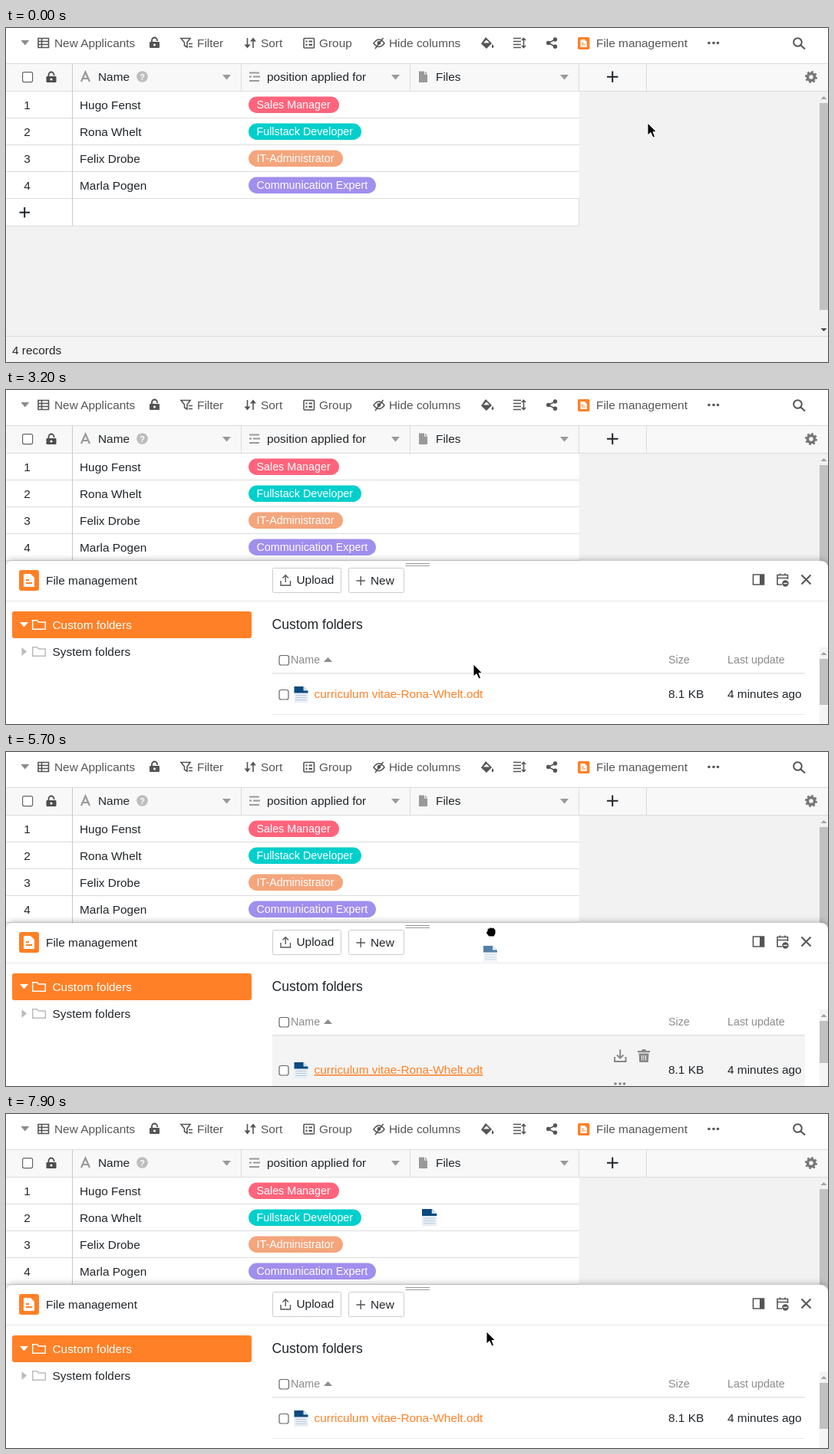
An HTML page that plays this animation: 1071x436 px, repeating every 8000 ms.

```html
<!DOCTYPE html>
<html lang="en">
<head>
<meta charset="utf-8">
<title>Drag a file into a table</title>
<style>
html, body { margin: 0; width: 100%; height: 100%; overflow: hidden; background: #fff; }
svg { display: block; font: 15.4px "Liberation Sans", Arial, sans-serif; fill: #212529; }
.bar text { fill: #555; }
.small { font-size: 14.3px; }
.muted { fill: #8c8c8c; }
.line { fill: none; stroke: #dcdcdc; }
.ico { fill: none; stroke: #555; stroke-width: 1.6; }
.solid { fill: #555; }
.box { fill: #fff; stroke: #666; stroke-width: 1.2; }
.white { fill: #fff; }
.orange { fill: #ff8027; }
</style>
</head>
<body>
<svg width="1071" height="436" viewBox="0 0 1071 436">
<defs>
  <g id="lock"><rect y="6" width="13" height="8" rx="1"/><path d="M3 7V4A3.5 3.5 0 0 1 10 4V5" fill="none" stroke="#4d4d4d" stroke-width="1.8"/><circle cx="6.5" cy="10" r="1.6" fill="#fff"/></g>
  <path id="down" d="M0 0H11L5.5 6.5Z"/>
  <path id="up" d="M0 4H8L4 0Z"/>
  <path id="folder" d="M.7 12.3V.7H6.5L8.5 3H17.3V12.3Z" fill="none" stroke-width="1.5"/>
  <g id="app"><rect width="26" height="27" rx="3" class="orange"/><path d="M6 5H15L20 10V22H6Z" class="white"/><path d="M9 13H13M9 17H17" stroke="#ff8027" stroke-width="2"/></g>
  <g id="doc"><path d="M0 0H13L18 5V21H0Z" fill="#e9eff6"/><path d="M0 0H12L18 6V8.5H0Z" fill="#0d4a80"/><path d="M12 0V5.5H18Z" fill="#d5e0ec"/><path d="M2 11.5H16M2 14.5H16M2 17.5H16" stroke="#b9cbdd"/></g>
  <g id="dots"><circle cx="2" cy="2" r="1.8"/><circle cx="8" cy="2" r="1.8"/><circle cx="13.5" cy="2" r="1.8"/></g>
  <filter id="shade" x="-5%" y="-10%" width="110%" height="120%"><feDropShadow dx="0" dy="-1" stdDeviation="4" flood-opacity=".28"/></filter>
</defs>

<!-- table background -->
<path d="M0 83H1071V436H0Z" fill="#f2f2f2"/>
<path d="M0 47H1071V82H0Z" fill="#f8f8f8"/>
<path d="M0 83H747V258H0Z" class="white"/>
<path id="rowHover" d="M0 118H746V152H0Z" fill="#f5f5f5"/>
<path class="line" d="M0 46.5H1071M0 82.5H1071M0 117.5H747M0 152.5H747M0 187.5H747M0 222.5H747M0 258.5H747M306.5 47V82M526.5 47V82M746.5 47V82M746.5 223V258M834.5 47V82"/>
<path class="line" d="M86.5 47V258" style="stroke:#c8c8c8"/>

<!-- toolbar -->
<rect id="buttonHover" x="736" y="8" width="161" height="25" rx="2"/>
<g class="bar">
  <use href="#down" x="19.3" y="16" class="muted"/>
  <path class="ico" d="M42 13.5H55.5V25.5H42ZM42 17.5H55.5M42 21.5H55.5M46.5 13.5V25.5"/>
  <text x="63" y="25">New Applicants</text>
  <use href="#lock" x="187" y="12" class="solid"/>
  <path class="ico" d="M228 13.5H240L236 19V25L232.5 23V19ZM238 20.5H243M238 24.5H243"/>
  <text x="249" y="25">Filter</text>
  <path class="ico" d="M314.5 13V25M322 26V14" stroke-width="2"/><path class="solid" d="M310.5 21.5H318.5L314.5 26.5ZM318 17.5H326L322 12.5Z"/>
  <text x="332" y="25">Sort</text>
  <rect class="ico" x="388" y="13.5" width="13.5" height="12.5" rx="1"/><path class="ico" d="M390.5 17.5H392.5M394.5 17.5H399M390.5 21.8H392.5M394.5 21.8H399" style="stroke-width:2.2"/>
  <text x="408" y="25">Group</text>
  <path class="ico" d="M479 20Q486 10 493 20Q486 29 479 20ZM481 27L491.5 13"/><circle class="solid" cx="486" cy="19.5" r="2.4"/>
  <text x="499" y="25">Hide columns</text>
  <path class="solid" d="M625 12L633 20L626 27L619 20.5ZM634 21Q637 25.5 634 26Q631.5 25.5 634 21Z"/><path d="M622 19.5L626 15.5L630 19.5Z" class="white"/>
  <path class="ico" d="M661 13.5H671M661 17.5H671M661 21.5H671M661 25.5H671M674.5 14V25M672 16L674.5 13.5L677 16M672 23L674.5 25.5L677 23"/>
  <path class="ico" d="M716 15L706.5 19.5L716 24.5"/><g class="solid"><circle cx="715.5" cy="15" r="2.7"/><circle cx="706.7" cy="19.5" r="2.7"/><circle cx="715.5" cy="24.3" r="2.7"/></g>
  <use href="#app" transform="translate(745 12) scale(.59)"/>
  <text x="769" y="25">File management</text>
  <use href="#dots" x="914" y="17.5" class="solid"/>
  <circle class="ico" cx="1031.5" cy="18.5" r="5.3" style="stroke-width:2"/><path class="ico" d="M1035.5 22.5L1041 27.5" style="stroke-width:2.2"/>
</g>

<!-- column heads -->
<rect class="box" x="21.6" y="57.6" width="13" height="13" rx="2"/>
<use href="#lock" x="52.5" y="57" fill="#4d4d4d"/>
<path d="M98 70L103.5 57.5L109 70M100.5 66H106.5" fill="none" stroke="#999" stroke-width="2.2"/>
<text x="120" y="69">Name</text>
<circle cx="177.5" cy="63.5" r="7.3" fill="#bdbdbd"/><text x="177.5" y="67.5" text-anchor="middle" class="white" style="font:bold 11px 'Liberation Sans',sans-serif">?</text>
<path d="M317 58.5H330M322 63.5H331M317 69H330M317 63.5H320" stroke="#999" stroke-width="1.8"/>
<text x="340" y="69">position applied for</text>
<path d="M538 56.5H545V60.5H549V71H538ZM546 56.5L549 59.5H546Z" fill="#999"/>
<text x="560" y="69">Files</text>
<g fill="#999"><use href="#down" x="282" y="61"/><use href="#down" x="502" y="61"/><use href="#down" x="722" y="61"/></g>
<path d="M783 63.7H797.5M790.2 56.5V71M17.5 240.7H31M24.2 234V247.5" stroke="#212529" stroke-width="2"/>
<g fill="none" stroke="#777"><circle cx="1049" cy="64" r="4.5" stroke-width="3.6"/><circle cx="1049" cy="64" r="6.9" stroke-width="2.2" stroke-dasharray="2.71"/></g>

<g id="rows"></g>

<!-- scrollbar and footer -->
<path d="M1060 98H1071V368H1060Z" fill="#c1c1c1"/>
<use href="#up" x="1061.5" y="89" fill="#a3a3a3"/><path d="M1061.5 392H1069.5L1065.5 396Z" fill="#444"/>
<path d="M0 403H1071V436H0Z" fill="#f4f4f4"/><path class="line" d="M0 402.5H1071"/>
<text x="8" y="426">4 records</text>

<use id="cellDoc" href="#doc" transform="translate(542 124) scale(1.07)"/>
<g id="drop">
  <rect x="527.5" y="118.5" width="200" height="33" fill="#fff2e8" stroke="#f6a264" stroke-dasharray="3 2"/>
  <text x="536.5" y="141" fill="#999">Drag and drop to add a file</text>
</g>

<!-- file panel -->
<g id="panel">
  <path d="M0 450V233Q0 223 10 223H1061Q1071 223 1071 233V450Z" class="white" filter="url(#shade)"/>
  <path d="M520.5 226.5H552M520.5 229.5H552" stroke="#999"/>
  <use href="#app" x="17" y="235"/>
  <text x="52" y="254">File management</text>
  <path class="ico" d="M973.5 241H987.5V254H973.5Z"/><path class="solid" d="M982 241H988V254H982Z"/>
  <path class="ico" d="M1011 254H1005V241.5H1018.5V247M1005 245.5H1018.5M1008.5 239.5V242M1015 239.5V242"/><circle class="solid" cx="1015.5" cy="252.5" r="4.2"/><path d="M1013 252.5H1018" stroke="#fff" stroke-width="1.4"/>
  <path class="ico" d="M1036.5 241.5L1048.5 253.5M1048.5 241.5L1036.5 253.5" style="stroke-width:2"/>
  <g id="content">
    <rect class="line" x="347.5" y="232.5" width="89" height="32" rx="2" style="stroke:#ccc"/>
    <path class="ico" d="M358 249V255H370.5V249M364.2 251V242M360.5 245.5L364.2 241.8L368 245.5" style="stroke-width:1.4"/>
    <text x="378.5" y="253">Upload</text>
    <rect class="line" x="446.5" y="232.5" width="72" height="32" rx="2" style="stroke:#ccc"/>
    <path class="ico" d="M456.5 249H468M462.2 243V255" style="stroke-width:1.4"/>
    <text x="475" y="254">New</text>
    <path class="line" d="M0 275.5H1071" style="stroke:#e8e8e8"/>
    <rect x="8" y="289" width="312" height="35" rx="3" class="orange"/>
    <use href="#down" x="18" y="303" class="white"/><use href="#folder" x="34" y="300" stroke="#fff"/>
    <text x="60.5" y="312" class="white">Custom folders</text>
    <path d="M20.5 336V347L27 341.5Z" fill="#bbb"/><use href="#folder" x="34" y="335" stroke="#bbb"/>
    <text x="60.5" y="347">System folders</text>
    <text x="346.5" y="312" font-size="17.6">Custom folders</text>
    <rect class="box" x="356" y="346.5" width="12.5" height="12.5" rx="2.5"/>
    <g class="small muted"><text x="371" y="357">Name</text><text x="863" y="357">Size</text><text x="940" y="357">Last update</text><path d="M414 355H425L419.5 349Z"/></g>
    <path id="fileHover" d="M347 370H1041V436H347Z" fill="#f4f4f4"/>
    <path class="line" d="M347 369.8H1041" style="stroke:#e4e4e4;stroke-width:1.5"/>
    <path id="fileLine" class="line" d="M347 423.5H1041" style="stroke:#e8e8e8"/>
    <g id="file">
      <rect class="box" x="356" y="391.5" width="12" height="12.5" rx="2.5"/>
      <use href="#doc" x="375.5" y="387"/>
      <text id="link" x="401.5" y="402" class="orange">curriculum vitae-Rona-Whelt.odt</text>
      <text x="863" y="402">8.1 KB</text><text x="940" y="402">4 minutes ago</text>
    </g>
    <g id="tools" fill="#888">
      <path d="M793 398V404H807.5V398M800.2 388.5V399M796 395.5L800.2 399.7L804.5 395.5" fill="none" stroke="#888" stroke-width="2"/>
      <path d="M823 390H828L829 388H833L834 390H839V392.3H823ZM824.5 393.5H837.5L836.8 405H825.2Z"/><path d="M828.5 396V402.5M831 396V402.5M833.5 396V402.5" stroke="#f4f4f4"/>
      <use href="#dots" x="792" y="431"/>
    </g>
    <path d="M1060 336H1071V436H1060Z" fill="#f4f4f4"/><use href="#up" x="1061.5" y="342" fill="#a3a3a3"/>
    <rect id="thumb" x="1060" y="351" width="11" fill="#c1c1c1"/>
  </g>
</g>

<!-- pointer -->
<use id="ghost" href="#doc" opacity=".7"/>
<g id="cursor" fill="#000" stroke="#fff">
  <path id="arrow" d="M0 0V16L4 12.5L7 19L9.5 18L7 11.5H11.5Z"/>
  <path id="hand" d="M3.5 1.5Q5 0 6.5 1.5V6L12 7.5Q13.5 8 13 10L12 15.5H4.5L1 11Q0 8.5 1.5 8.5L3.5 9.5Z"/>
  <path id="grab" d="M2 4Q3 1 5 2Q7 0 8 1.5Q10 .5 11 2.5Q13 3 13 5V9L11 13H4L1 9Q-.5 7 2 6Z"/>
  <path id="plus" d="M12.5 11.5H16.5V15H20V18.5H16.5V22H12.5V18.5H9V15H12.5Z" fill="#fff" stroke="#fff"/>
  <path id="plusMark" d="M14.5 12V21.5M9.7 16.8H19.3" stroke="#000" stroke-width="3.6"/><path id="plusCore" d="M14.5 13.3V20.2M11 16.8H18" stroke="#fff" stroke-width="1.4"/>
</g>
</svg>
<script>
const $ = id => document.getElementById(id);
const show = (id, on) => $(id).style.display = on ? '' : 'none';
const move = (id, x, y) => $(id).setAttribute('transform', `translate(${x} ${y})`);

// name, position, pill colour, pill width
const people = [
  ['Hugo Fenst', 'Sales Manager', '#ff647c', 118],
  ['Rona Whelt', 'Fullstack Developer', '#00cfcb', 147],
  ['Felix Drobe', 'IT-Administrator', '#f4a57c', 123],
  ['Marla Pogen', 'Communication Expert', '#a08fee', 166],
];
$('rows').innerHTML = people.map(([name, job, color, width], i) => `
  <g transform="translate(0 ${35 * i})">
    <text x="27.5" y="106" text-anchor="middle">${i + 1}</text><text x="96" y="106">${name}</text>
    <rect x="316" y="89.5" width="${width}" height="21.5" rx="10.7" fill="${color}"/>
    <text x="326.5" y="105" class="small white">${job}</text>
  </g>`).join('');

// time, x, y
const cursorPath = [
  [400, 836, 124], [600, 850, 64], [800, 850, 64], [900, 846, 16], [2400, 846, 16],
  [2500, 815, 82], [2900, 690, 262], [3300, 582, 390], [3900, 529, 409], [4900, 529, 409],
  [5400, 577, 350], [5700, 625, 228], [5800, 626, 160], [5900, 627, 141], [6000, 627, 134],
  [6200, 627, 123], [7600, 627, 123], [7900, 626, 284],
];
const ghostPath = [
  [4900, 525, 409], [5400, 572, 375], [5700, 622, 253], [5800, 622, 175], [5900, 622, 143],
  [6000, 622, 134], [6200, 622, 123],
];

function along(path, t) {
  const i = path.findIndex(k => k[0] > t);
  if (i < 0) return path.at(-1).slice(1);
  if (!i) return path[0].slice(1);
  const a = path[i - 1], b = path[i], p = (t - a[0]) / (b[0] - a[0]);
  return [a[1] + (b[1] - a[1]) * p, a[2] + (b[2] - a[2]) * p];
}

function draw(now) {
  const t = Math.floor(now % 8000 / 100) * 100;
  const during = (from, to) => t >= from && t < to;
  const [x, y] = along(cursorPath, t);

  show('buttonHover', during(900, 2600));
  $('buttonHover').setAttribute('fill', t < 2500 ? '#efefef' : '#f5f5f5');
  show('panel', t >= 1400);
  show('content', t >= 1500);
  move('panel', 0, t < 1500 ? 167 : 0);

  const fileOver = during(3300, 6800), linkOver = during(3600, 6800);
  for (const id of ['fileHover', 'tools']) show(id, fileOver);
  show('fileLine', !fileOver);
  move('file', 0, fileOver ? 18 : 0);
  $('link').setAttribute('text-decoration', linkOver ? 'underline' : 'none');
  $('thumb').setAttribute('height', fileOver ? 55 : 60);

  show('drop', during(5800, 6800));
  move('drop', 0, t < 5900 ? 35 : 0);
  show('rowHover', during(6800, 7700));
  show('cellDoc', t >= 6900);

  const dragging = during(5000, 6600), pointing = during(900, 2600) || during(3600, 5000);
  show('ghost', dragging);
  move('ghost', ...along(ghostPath, t));
  move('cursor', x, y);
  show('hand', pointing);
  show('grab', dragging);
  show('arrow', !pointing && !dragging);
  for (const id of ['plus', 'plusMark', 'plusCore']) show(id, during(5800, 6600));
  requestAnimationFrame(() => draw(performance.now() - start));
}
const start = performance.now();
draw(0);
</script>
</body>
</html>
```
